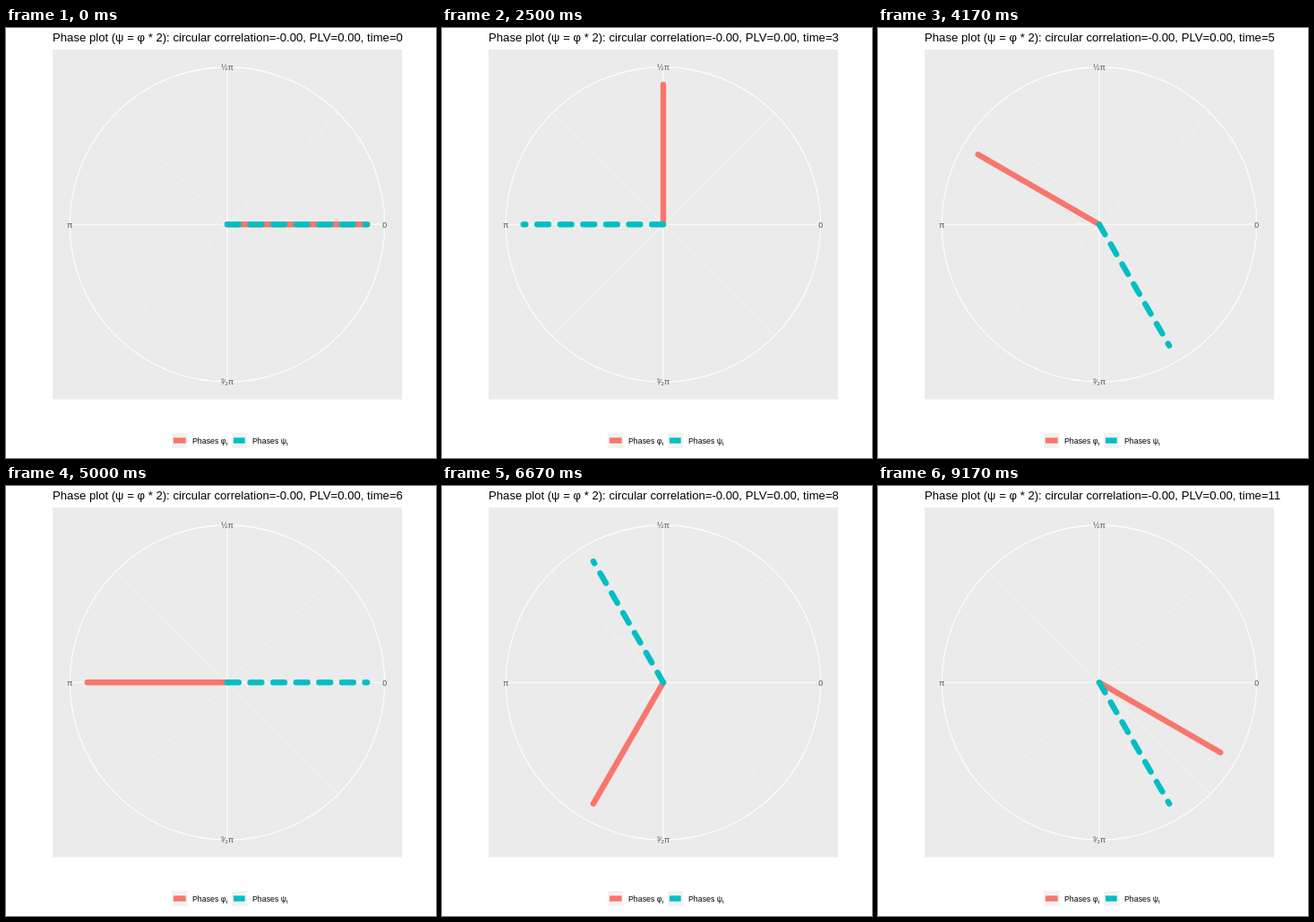
Write an HTML page that moves like this. It is 480 px wide and 480 px high and loops after 10 s.

```html
<!DOCTYPE html>
<html lang="en">
<head>
<meta charset="utf-8">
<title>Phase plot</title>
<style>
  html, body { margin: 0; width: 100%; height: 100%; overflow: hidden; background: #fff; }
  svg { display: block; width: 100vw; height: 100vh; }
  text { font: 8.8px "Liberation Sans", Arial, sans-serif; white-space: pre; }
  #title { font-size: 13.15px; }
  .sub { font-size: 6.2px; }
  .axis { fill: #4d4d4d; text-anchor: middle; }
  .grid { fill: none; stroke: #fff; stroke-width: 1.07; }
  .minor { stroke-width: .53; }
  .phi, .psi { stroke: #f8766d; stroke-width: 6.4; }
  .psi { stroke: #00bfc4; stroke-dasharray: 12.8; }
  .hand { stroke-linecap: round; }
</style>
</head>
<body>
<svg viewBox="0 0 480 480">
  <text id="title" x="52" y="15"></text>
  <rect x="52" y="24" width="390" height="390.5" fill="#ebebeb"/>
  <g transform="translate(247 219.3)">
    <path class="grid minor" d="M-124.2-124.2 124.2 124.2M-124.2 124.2 124.2-124.2"/>
    <path class="grid" d="M-175.7 0H175.7M0-175.7V175.7"/>
    <circle class="grid" r="175.7"/>
    <line id="phi" class="phi hand" x2="156.2"/>
    <line id="psi" class="psi hand" x2="156.2"/>
    <g class="axis">
      <text x="175.7" y="3.2">0</text>
      <text y="-172.5">½π</text>
      <text x="-175.7" y="3.2">π</text>
      <text y="178.9">³⁄₂π</text>
    </g>
  </g>
  <g id="legend"></g>
</svg>
<script>
  const LOOP = 10000, STEPS = 12;
  const get = id => document.getElementById(id);

  const key = (x, name, letter) => `
    <rect x="${x}" y="451.9" width="17.3" height="17.3" fill="#f2f2f2"/>
    <path class="${name}" d="M${x + 1.7} 460.5h13.8"/>
    <text x="${x + 22.8}" y="464">Phases ${letter}<tspan class="sub" dy="1.6">t</tspan></text>`;
  get("legend").innerHTML = key(185.2, "phi", "φ") + key(252.2, "psi", "ψ");

  let shown = -1;
  function draw(now) {
    // step starts are rounded to 10 ms, hence the small lead
    const step = Math.floor(((now % LOOP) + 4) * STEPS / LOOP) % STEPS;
    if (step !== shown) {
      shown = step;
      get("title").textContent =
        `Phase plot (ψ = φ * 2): circular correlation=-0.00, PLV=0.00, time=${step}`;
      get("phi").setAttribute("transform", `rotate(${-30 * step})`);
      get("psi").setAttribute("transform", `rotate(${-60 * step})`);
    }
    requestAnimationFrame(() => draw(performance.now() - start));
  }
  const start = performance.now();
  draw(0);
</script>
</body>
</html>
```
